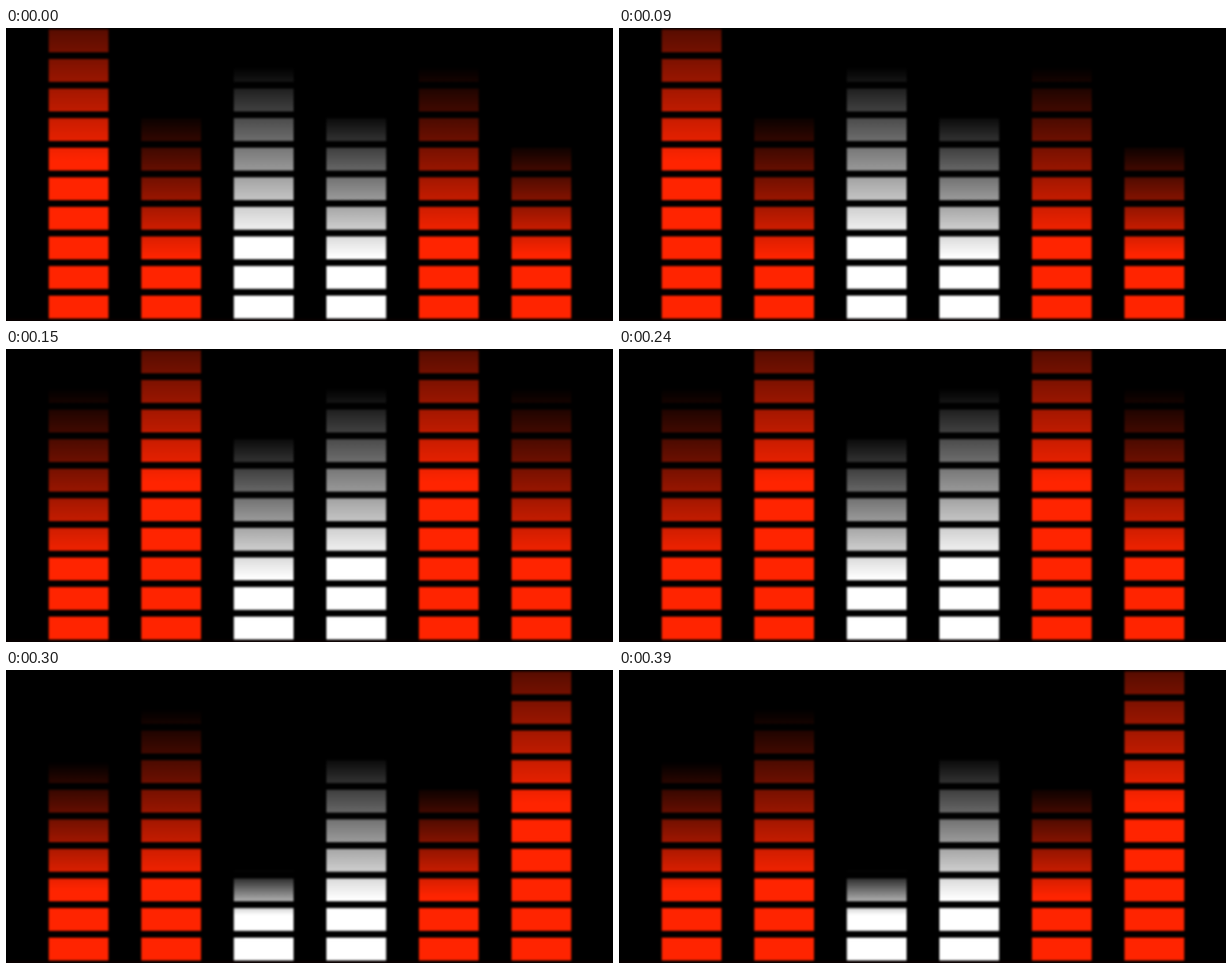
Write an HTML page with a canvas that moves like this. It is 648 px wide and 313 px high and loops after 450 ms.

```html
<!DOCTYPE html>
<html lang="en">
<head>
<meta charset="utf-8">
<title>Equalizer</title>
<style>
html, body { margin: 0; width: 100%; height: 100%; overflow: hidden; background: #000; }
canvas { display: block; filter: blur(1.05px); }
</style>
</head>
<body>
<canvas width="648" height="313"></canvas>
<script>
const ctx = document.querySelector('canvas').getContext('2d');
const STEP = 150;
const RED = '255,36,0', WHITE = '255,255,255';
const colors = [RED, RED, WHITE, WHITE, RED, RED];

// Each level fades from black at its first y to full colour at its second.
const levels = {
  peak: [-72, 142],
  high: [42, 226],
  mid: [90, 245],
  warm: [98, 235],
  low: [121, 242],
  floor: [214, 262]
};
const poses = [
  'peak mid high mid high low',
  'high peak mid high peak high',
  'warm high floor mid low peak'
].map(pose => pose.split(' '));

function drawBar(col, level) {
  const [top, full] = levels[level];
  const fade = ctx.createLinearGradient(0, top, 0, full);
  fade.addColorStop(0, `rgba(${colors[col]},0)`);
  fade.addColorStop(1, `rgb(${colors[col]})`);
  ctx.fillStyle = fade;
  for (let row = 0; row < 10; row++) {
    ctx.fillRect(45.6 + col * 98.8, 1.5 + row * 31.6, 63.8, 24.4);
  }
}

function draw(pose) {
  ctx.fillStyle = '#000';
  ctx.fillRect(0, 0, 648, 313);
  ctx.fillStyle = '#100000';
  ctx.fillRect(0, 311.5, 648, 1.5);
  pose.forEach((level, col) => drawBar(col, level));
}

let shown = -1;
function tick() {
  const step = Math.floor(performance.now() / STEP) % poses.length;
  if (step !== shown) draw(poses[shown = step]);
  requestAnimationFrame(tick);
}
tick();
</script>
</body>
</html>
```
